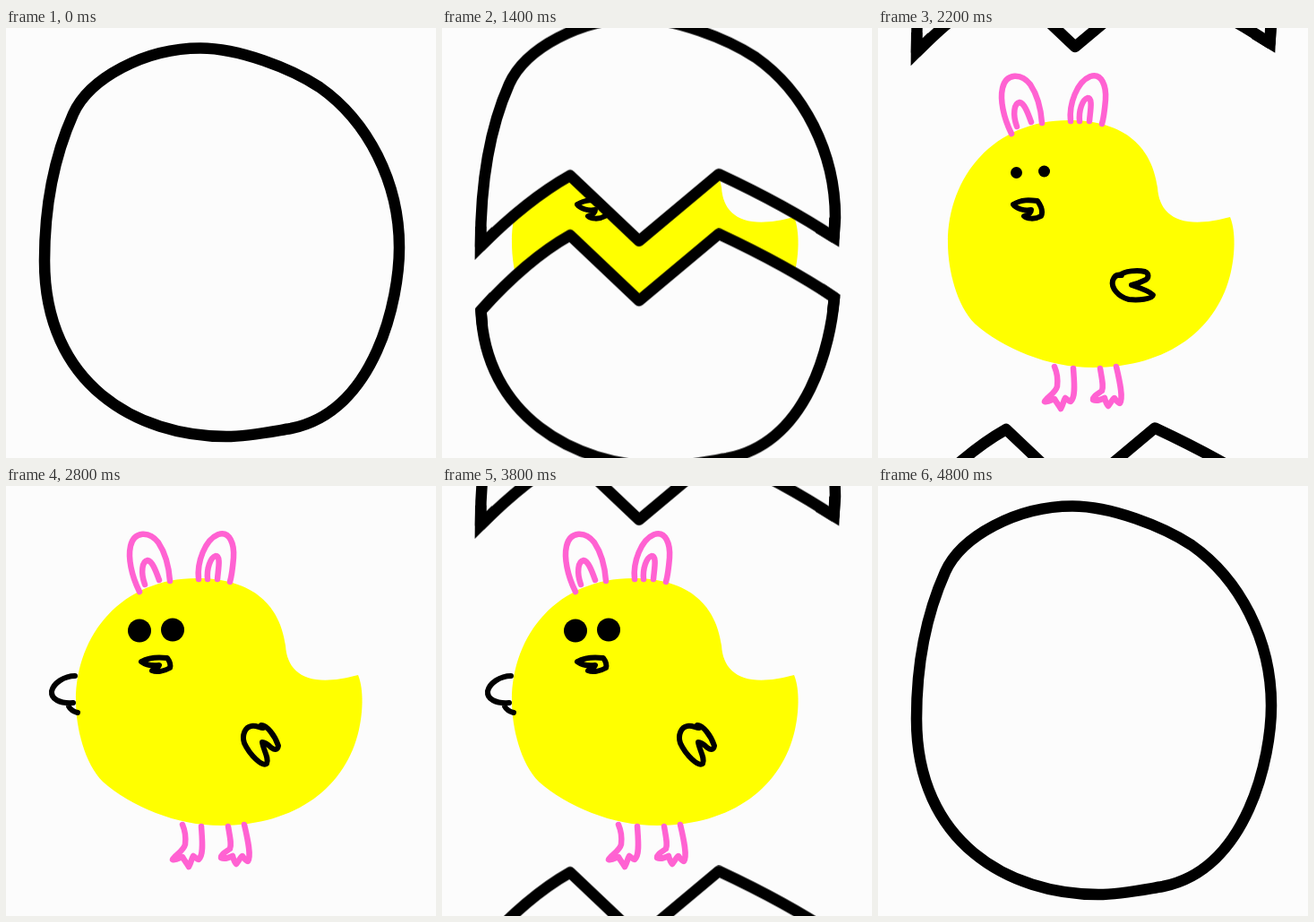
An HTML page without scripts for the animation above (6000 ms loop, 480x480 px).

```html
<!DOCTYPE html>
<html lang="en">
<head>
<meta charset="utf-8">
<title>Hatching chick</title>
<style>
  html, body { margin: 0; width: 100%; height: 100%; overflow: hidden; background: #fcfcfc; }
  svg { display: block; width: 100%; height: 100%; }
  .ink { fill: none; stroke: #000; stroke-width: 6; stroke-linecap: round; stroke-linejoin: round; }
  .pink { fill: none; stroke: #ff62d2; stroke-width: 6.5; stroke-linecap: round; stroke-linejoin: round; }
  .thick { fill: none; stroke: #000; stroke-width: 12.5; stroke-linecap: round; stroke-linejoin: round; }
  .solid { fill: #fcfcfc; }
  .corner { stroke-linejoin: miter; stroke-linecap: butt; }

  /* a few ms early, so each step is settled on its tick */
  .egg, .shell, .pose { animation: 6s -5ms infinite step-end; }
  .egg { animation-name: egg; }
  .shell { animation-name: shell; }
  .top { --dir: -1px; }
  .bottom { --dir: 1px; }
  .rest { animation-name: rest; }
  .up { animation-name: up; }
  .down { animation-name: down; }
  .crack path { opacity: 0; animation: crack 6s var(--at) infinite step-end; }

  @keyframes egg { 0%, 80%, 100% { opacity: 1 } 21% { opacity: 0 } }
  @keyframes crack { 0% { opacity: 1 } 50%, 100% { opacity: 0 } }
  @keyframes shell {
    0%, 80%, 100% { opacity: 0; transform: translateY(0) }
    21% { opacity: 1; transform: translateY(0); animation-timing-function: steps(21) }
    42% { opacity: 1; transform: translateY(calc(350 * var(--dir))) }
    59% { opacity: 1; transform: translateY(calc(300 * var(--dir))); animation-timing-function: steps(18) }
    77% { opacity: 1; transform: translateY(0) }
  }
  /* wings flap every 2% of the loop */
  @keyframes rest { 0%, 68%, 100% { opacity: 1 } 44% { opacity: 0 } }
  @keyframes up {
    0%, 46%, 50%, 54%, 58%, 62%, 66%, 100% { opacity: 0 }
    44%, 48%, 52%, 56%, 60%, 64% { opacity: 1 }
  }
  @keyframes down {
    0%, 48%, 52%, 56%, 60%, 64%, 68%, 100% { opacity: 0 }
    46%, 50%, 54%, 58%, 62%, 66% { opacity: 1 }
  }
</style>
</head>
<body>
<svg viewBox="0 0 480 480">
  <defs>
    <g id="face">
      <path d="M151 197C160 191 170 192 178 193C183 200 184 206 182 210C175 214 166 213 163 210C166 209 171 207 171 203C163 205 154 201 151 197Z"/>
      <path d="M270 276C275 271 290 270 298 272C303 274 302 279 299 281C293 284 287 286 283 287C292 290 302 293 307 298C306 303 290 304 280 303C268 300 260 290 262 282C264 276 268 275 272 276"/>
    </g>
  </defs>

  <!-- chick -->
  <path fill="#ff0" d="M78 240C78 165 130 103 213 103C278 103 306 135 312 178C314 210 338 226 393 211C400 228 398 255 394 272C380 335 325 379 240 379C190 379 140 358 108 330C88 310 78 270 78 240Z"/>
  <g class="pink">
    <path d="M149 118C140 100 136 80 139 67C143 50 160 50 170 63C178 75 182 92 183 106"/>
    <path d="M155 110C150 96 152 84 158 83C164 84 168 97 171 105"/>
    <path d="M215 104C213 85 222 60 237 54C250 50 255 65 254 80C253 92 252 100 250 107"/>
    <path d="M225 104C224 92 228 80 234 78C240 78 237 92 236 104"/>
    <path d="M197 378C200 385 201 392 200 400C198 408 188 412 186 417C190 418 194 415 197 414C199 418 202 421 204 425C207 420 207 416 209 413C212 415 213 417 215 417C221 412 219 395 218 380"/>
    <path d="M248 380C250 392 252 400 250 405C246 408 240 411 240 415C244 417 249 415 253 413C254 417 255 420 257 422C260 418 262 414 264 413C266 416 268 419 270 419C274 413 270 395 266 378"/>
  </g>

  <g class="pose rest">
    <circle cx="154.5" cy="161.5" r="6.5"/>
    <circle cx="185.5" cy="160" r="6.5"/>
    <use href="#face" class="ink"/>
  </g>
  <g class="pose up">
    <circle cx="151.5" cy="161.5" r="13"/>
    <circle cx="191" cy="161" r="13"/>
    <use href="#face" class="ink"/>
    <path class="ink" d="M81 217C75 211 60 207 51 211C43 215 46 222 50 228C53 233 57 237 60 239C54 237 52 239 54 244C58 256 64 266 70 268C74 270 77 268 79 267"/>
  </g>
  <g class="pose down">
    <circle cx="149" cy="161.5" r="13"/>
    <circle cx="186" cy="160.5" r="13"/>
    <g class="ink">
      <path d="M151 196C160 191 172 191 180 192C183 196 184 200 183 203C176 207 168 208 163 206C166 205 170 203 171 200C163 201 155 199 151 196Z"/>
      <path d="M285 267C291 267 300 278 304 290C303 296 299 294 296 292C292 288 289 286 286 286C287 294 294 304 291 310C286 314 272 300 266 287C263 278 267 269 274 268C279 267 283 270 287 270"/>
      <path d="M77 212C65 212 53 220 51 229C50 238 60 243 75 242M70 246C72 250 76 252 80 253"/>
    </g>
  </g>

  <!-- shell halves -->
  <g class="shell top">
    <path class="thick solid" d="M43 277C43 205 54 143 75 96C93 56 155 22.500 217 22.500C260 22.500 318 45 350 66C404 104 439 172 439 245L437.500 267Q385 232 309 196.500L220 271L143 198Q95 225 43 277Z"/>
    <path class="thick corner" d="M43.200 255L43 277L60 260M438.500 245L437.500 267L420 256.500"/>
  </g>
  <g class="shell bottom">
    <path class="thick solid" d="M43.500 282Q95 225 143 198L220 271L309 196.500Q385 232 438 267.500C434 318 410 429 318 447C294 451 270 456 246 456C146 456 48 398 43.500 282Z"/>
    <path class="thick corner" d="M45 298L43.500 282L58 266M423 257.500L438 267.500L436 283"/>
  </g>

  <!-- whole egg -->
  <g class="egg">
    <path class="thick solid" d="M43 260C43 200 54 143 75 96C93 56 155 22.500 217 22.500C260 22.500 318 45 350 66C404 104 439 172 439 245C439 302 413 428 318 447C294 451 270 456 246 456C146 456 43 398 43 260Z"/>
    <g class="thick crack">
      <path style="--at:295ms" d="M50 274Q97 224 143 198"/>
      <path style="--at:475ms" d="M143 198L220 271"/>
      <path style="--at:775ms" d="M220 271L309 196.500"/>
      <path style="--at:955ms" d="M309 196.500Q385 232 433 264"/>
    </g>
  </g>
</svg>
</body>
</html>
```
